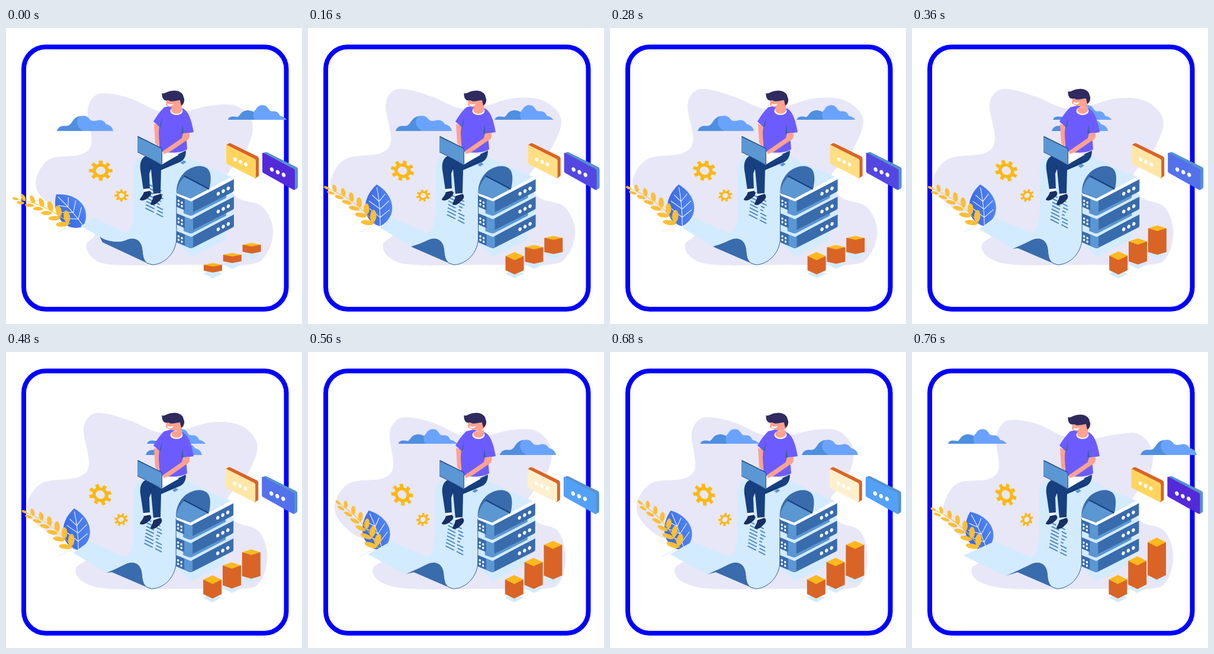
An HTML page that plays this animation: 500 px wide and 500 px high, repeating every 800 ms.

```html
<!DOCTYPE html>
<html lang="en">
<head>
<meta charset="utf-8">
<title>Data report</title>
<style>
html,body{margin:0;width:100%;height:100%;overflow:hidden;background:#fff}
svg{display:block;width:100vw;height:100vh}
</style>
</head>
<body>
<svg viewBox="0 0 500 500">
  <defs>
    <linearGradient id="leafFill" x1="0" y1="0" x2="1" y2="0">
      <stop offset="0" stop-color="#3b69e0"/><stop offset="1" stop-color="#4f85f5"/>
    </linearGradient>
  </defs>
  <rect x="30" y="32" width="443.500" height="443" rx="37" fill="none" stroke="#00f" stroke-width="8"/>
  <path id="blob" fill="#e8e7f7"/>
  <g id="cloudA">
    <path fill="#4f8fe0" d="M86 173.500C88 167 93 164 101 165C107 165 109 162 113 156C118 149 126 146 133 150L140 173.500Z"/>
    <path fill="#6aa3ff" d="M131 173.500C121 168 117 158 123 150C130 146 138 148 141 153C145 158 148 156 153 156C160 153 167 157 169 162C176 163 180 168 181 173.500Z"/>
  </g>
  <g id="cloudB">
    <path fill="#4f8fe0" d="M375 154.500C376 149 383 148 391 150C396 147 397 140 405 139C413 137 417 142 423 142L430 154.500Z"/>
    <path fill="#6aa3ff" d="M420 154.500C416 147 418 140 422 137C426 128 438 128 442 134C445 138 446 141 452 140C459 140 461 144 463 148C469 149 472 152 474 154.500Z"/>
  </g>
  <path id="gearA" fill="#fdb813" fill-rule="evenodd"/>
  <path id="gearB" fill="#fdb813" fill-rule="evenodd"/>
  <path fill="none" stroke="#d9ebfb" d="M88 345L140 319"/>
  <g id="leaf">
    <path fill="url(#leafFill)" d="M0 0C-30 -10 -31 -48 -1 -71C27 -52 33 -16 0 0Z"/>
    <path fill="none" stroke="#fff" d="M0 0Q3 -34 -1 -66M1 -15L-16 -31M1 -15L18 -27M2 -29L-16 -44M2 -29L18 -42M1 -42L-10 -54M1 -42L12 -54"/>
  </g>
  <g id="branch" fill="#fcbf35"></g>
  <g id="scene">
    <path fill="#d3ebff" d="M288 362L313 387L370 358L372 335L330 335Z"/>
    <g id="servers"></g>
    <path fill="#d3ebff" d="M290 215L348 238L385 253L313 291L288 282Z"/>
    <path fill="#fff" d="M288 277L313 288L384 249.500Q387 253 384 256L313 293L288 283Z"/>
    <path id="fold" fill="#396cad"/>
    <path id="sheet" fill="#d3ebff"/>
    <path fill="#396cad" d="M288 279C287 263 295 247 308 239C321 231 337 231 343 241C347 249 346 259 344 270L312 288Z"/>
    <path fill="#5b97d2" d="M302 251L343 272L312 288L288 278C290 266 295 257 302 251Z"/>
    <path fill="none" stroke="#174080" stroke-width="2" d="M301 250L343 272"/>
    <path fill="none" stroke="#2b5fa3" d="M288 281V354C288 380 268 399 247 400L238 397"/>
    <path id="mark" fill="#5b97d2" d="M-5 .5L1 -3.500L5 -.5L-1 3.500Z"/>
    <g id="lines" stroke="#4f8ac6" stroke-width="2"></g>
  </g>
  <g id="man">
    <path fill="#174080" d="M304 207L289 214L263 231L236 216C227 221 225 230 228 246L232 273L243 272L242 246L245 238L249 281L261 280L262 240L295 226C302 222 304 215 304 207Z"/>
    <path fill="none" stroke="#0f3168" d="M245 239L244 232M262 238L292 223"/>
    <path fill="#fff" d="M232 272L243 271V276L233 277ZM249 280L261 279V283L249 285Z"/>
    <path fill="#172f63" d="M233 277L243 275C247 279 246 282 241 286C236 291 229 293 226 290C227 286 231 284 233 277ZM249 284L261 280C265 284 264 288 258 293C253 299 247 300 244 298C245 293 248 291 249 284Z"/>
    <path fill="#ffa28f" d="M250 162L261 166L258 202L252 194Z"/>
    <path fill="#fff" d="M263 205L292 214L264 230Z"/>
    <path fill="#6c5cff" d="M267 134L279 131L299 136C307 140 313 152 317 176L304 178L306 205C295 212 270 212 258 207C261 194 256 182 259 167L249 158C254 149 260 141 267 134Z"/>
    <path fill="#38629f" d="M264 150L262 165L259 168ZM298 163L300 178L296 179Z"/>
    <path fill="#ffa28f" d="M299 178L310 177C311 185 309 189 303 191L277 209L266 213L265 208L297 186Z"/>
    <path fill="#244f91" d="M223 182.500L262 202Q264 203 264 206V231L222 210V184Z"/>
    <path fill="#5b97d2" d="M222 184L261 203Q263 204 263 206V230L222 209Z"/>
    <ellipse cx="288" cy="140" rx="10.500" ry="7" fill="#fff"/>
    <path fill="#ffa28f" d="M280 135L297 132L297 140C293 147 282 146 279 140Z"/>
    <g id="head">
      <path fill="#ffa28f" d="M271 121H300V128C297 131 296 135 290 137L283 135C277 134 272 132 270 130Z"/>
      <path fill="#fff" d="M273 128Q278 130 283 128Q280 134 273 131Z"/>
      <path fill="#2f2b60" d="M263.500 110C269 112 272 106 282 106C291 105 299 109 300 117C303 122 300 129 296 131L294 122C286 122 281 126 274 122C266 124 263 118 263.500 110Z"/>
    </g>
  </g>
  <g id="front">
    <g id="bars"></g>
    <path fill="#d96426" d="M372 198L376 195Q378 194 380 195L425 217Q427 218 427 221V249Q427 251 425 251L421 254Z"/>
    <path id="noteA" d="M374 198L420 221Q422 222 422 225V251Q422 254 419 253L374 230Q372 229 372 227V199Q372 197 374 198Z"/>
    <path fill="#5592d0" d="M433 212L437 210Q439 209 441 210L491 235Q493 236 493 239V268Q493 271 490 272L487 274Z"/>
    <path id="noteB" d="M435 211L486 238Q488 239 488 242V271Q488 274 485 273L435 245Q433 244 433 242V212Q433 210 435 211Z"/>
    <g id="dots" fill="#fff"></g>
  </g>
</svg>
<script>
const $ = id => document.getElementById(id);
const set = (id, name, value) => $(id).setAttribute(name, value);
const move = (id, x, y = 0, turn = 0, more = '') =>
  set(id, 'transform', `translate(${x} ${y}) rotate(${turn}) ${more}`);
const { PI, sin, cos, exp, hypot, round } = Math;

// Sway angles of the plants, one per step.
const leafTurn = [-40, -4, -5, -18, -23];
const branchTurn = [-12, 0, 0, 12, 3];

const outline = '136,137 149,112 173,109 212,119 258,139 298,139 345,128 390,130 417,160 406,206 372,252 388,286 428,302 444,342 433,385 403,400 300,400 175,400 130,388 118,366 137,348 120,325 80,308 50,280 46,252 70,221 125,213 143,192'
  .split(' ').map(s => s.split(',').map(Number));
// Swelling lobes: centre, reach in x and y, step of the peak.
const lobes = [[140, 130, -6, -8, 1.5], [430, 150, 12, -5, 1.3], [330, 130, 0, 11, 4], [46, 250, -10, 0, 1.7], [445, 340, 9, 0, .5]];

function blob(i) {
  const p = outline.map(([x, y]) => {
    const near = (a, b) => exp(-((hypot(x - a, y - b) / 70) ** 2));
    let u = x + near(110, 375) * (18 - 9 * i), v = y;
    for (const [a, b, dx, dy, peak] of lobes) {
      const swell = near(a, b) * cos((i - peak) * PI * .4);
      u += dx * swell;
      v += dy * swell;
    }
    return [u, v];
  });
  return smooth(p);
}

function smooth(p) {
  const n = p.length;
  let d = 'M' + p[0];
  for (let i = 0; i < n; i++) {
    const [a, b, c, e] = [n - 1, 0, 1, 2].map(k => p[(i + k) % n]);
    d += `C${b[0] + (c[0] - a[0]) / 6} ${b[1] + (c[1] - a[1]) / 6} ${c[0] - (e[0] - b[0]) / 6} ${c[1] - (e[1] - b[1]) / 6} ${c}`;
  }
  return d + 'Z';
}

function gear(r) {
  let d = '';
  for (let k = 0; k < 8; k++) {
    for (const [turn, size] of [[-.23, .7], [-.16, 1], [.16, 1], [.23, .7]]) {
      const a = k * PI / 4 + turn;
      d += (d ? 'L' : 'M') + [r * size * cos(a), r * size * sin(a)];
    }
  }
  const h = r * .4;
  return d + `ZM${h} 0A${h} ${h} 0 1 0 ${-h} 0A${h} ${h} 0 1 0 ${h} 0Z`;
}

const oval = (x, y, rx, ry, turn = 0) =>
  `<ellipse rx="${rx}" ry="${ry}" transform="translate(${x} ${y}) rotate(${turn})"/>`;

function server(k) {
  let lights = '';
  for (let j = 0; j < 4; j++) lights += oval(291.5 + j % 2 * 5.5, 292 + j % 2 * 3 + (j >> 1) * 6, 1.7, 2, -20);
  for (let j = 0; j < 3; j++) lights += oval(358.5 + j * 8.5, 280 - j * 4.5, 2.6, 3.2, 25);
  const gap = `<path fill="#d3ebff" d="M288 300L313 312L372 280L385 279V284L313 323L288 313Z"/>
    <path fill="#5b97d2" d="M300 306L313 311L372 280V287L316 316Q312 318 308 316L300 313Z"/>`;
  return `<g transform="translate(0 ${k * 30})">${k < 2 ? gap : ''}
    <path fill="#396cad" d="M288 282L313 292L385 255V274Q385 276 383 277L316 311Q313 313 309 311L288 302Z"/>
    <path fill="#5b97d2" d="M302 288L313 292L316 291V311Q313 313 309 311L302 308Z"/>
    <g fill="#fff">${lights}</g></g>`;
}

function foliage() {
  let parts = '<path fill="none" stroke="#fcbf35" d="M0 0Q-35 -45 -86 -62"/>' + oval(-82, -61, 5, 2.2, 25);
  for (let k = 0; k < 6; k++) {
    const t = .06 + k * .155, s = 1 - k * .08, bow = t * (1 - t);
    const x = 16 * bow - 86 * t, y = -28 * bow - 62 * t;
    parts += oval(x + 1, y - 8 * s, 5.3 * s, 10.5 * s, 3 - k * 4) + oval(x - 9 * s, y + 3, 11 * s, 4.2 * s, 8 + k * 2);
  }
  return parts;
}

function writing() {
  let seed = 7, d = '';
  const random = () => (seed = seed * 16807 % 2147483647) / 2147483647;
  for (let k = 0; k < 8; k++) {
    let x = 239 - k * .7;
    const y = 289 + k * 6.1;
    for (const w of [7 + random() * 8, 4 + random() * 8]) {
      d += `M${x} ${y + (x - 239) * .5}l${w} ${w * .5}`;
      x += w + 3 + random() * 3;
    }
  }
  return `<path d="${d}"/>`;
}

function build() {
  set('gearA', 'd', gear(20));
  set('gearB', 'd', gear(12));
  $('servers').innerHTML = [2, 1, 0].map(server).join('');
  $('branch').innerHTML = foliage();
  $('lines').innerHTML = writing();
  $('dots').innerHTML = [0, 1, 2].map(k =>
    oval(387 + k * 9, 222 + k * 4.2, 2.8, 3.5, -25) + oval(449 + k * 10, 239 + k * 4.5, 3, 3.8, -25)).join('');
}

function bar(k, i) {
  const grown = sin(i * PI / 8) ** [.1, 1, 1.5][k];
  const x = 349.5 + k * 32.8, l = x - 15.5, r = x + 15.5, base = 415 - k * 16;
  const top = 397 - k * 17 - (20.5 + k * 14.5) * grown;
  const h = 3 + 4.7 * grown ** 2, bottom = 413 - k * 16 + 3.5 * grown;
  return `<path fill="#d3ebff" d="M${l} ${base}L${x} ${base - 8}L${r} ${base}L${x} ${base + 8}Z"/>
    <path fill="#d96426" d="M${l} ${top + h}H${r}V${bottom - h}L${x} ${bottom}L${l} ${bottom - h}Z"/>
    <path fill="#fbb91d" d="M${l} ${top + h}L${x} ${top}L${r} ${top + h}L${x} ${top + 2 * h}Z"/>`;
}

// The loose end slides out to the left while its first bend flattens.
function paper(i) {
  const bend = exp(-2.5 * i);
  const x = 182 - 5.7 * i - 24 * bend, y = 367.5 + 2.7 * i - 15.5 * bend;
  const far = 126 - 38 * (i / 4) ** 1.7;
  const curl = `M247 400C236 398 232 391 231 377C230 356 215 352 203 358C191 364 ${x + 10} ${y - 4 + 12 * bend} ${x} ${y}`;
  set('fold', 'd', `${curl}L${180 - 17 * bend} ${372 - 10 * bend}L238 397Z`);
  set('sheet', 'd', `${curl}L${far} ${335 + 2.2 * i}L${141 + 7 * bend} 320L202 346C212 342 215 330 216 310V240C216 228 221 220 228 216L262 222L300 215L348 238L330 233C302 232 288 255 288 281V354C288 380 268 399 247 400Z`);
}

const mix = (a, b, t) => `rgb(${a.map((v, k) => round(v + (b[k] - v) * t))})`;

function draw(i) {
  const left = (1 - i / 4) ** 2, drift = -.4 * i, fade = i % 4 / 3;
  set('blob', 'd', blob(i));
  move('cloudA', 75 * i - 13 * sin(i * PI / 2), .5);
  move('cloudB', -314 * (i / 4) ** 1.2, .5);
  move('gearA', 160 - i * .35, 241, i * 15, 'scale(1 .86)');
  move('gearB', 195 - i * .3, 283, i * -15, 'scale(1 .86)');
  move('leaf', 121 - leafTurn[i] * .25, 335, leafTurn[i]);
  move('branch', 113.5 + branchTurn[i] * .4, 331, branchTurn[i]);
  paper(i);
  move('scene', drift);
  move('front', drift);
  move('mark', 282.5 + 17 * left, 235 - 8 * left);
  move('lines', 1.5 - i * .6, -25 * left);
  move('head', 0, -3 * round(sin(i * PI / 5) ** 2));
  $('bars').innerHTML = [0, 1, 2].map(k => bar(k, i)).join('');
  set('noteA', 'fill', mix([255, 213, 95], [255, 240, 205], fade));
  set('noteB', 'fill', mix([84, 41, 218], [83, 161, 246], fade ** 1.25));
}

// Poses change on a 200 ms beat; the loop begins 40 ms into the first one.
let shown = -1;
function tick() {
  const i = Math.floor((performance.now() % 800 + 40) / 200);
  if (i !== shown) draw(shown = i);
  requestAnimationFrame(tick);
}
build();
tick();
</script>
</body>
</html>
```
